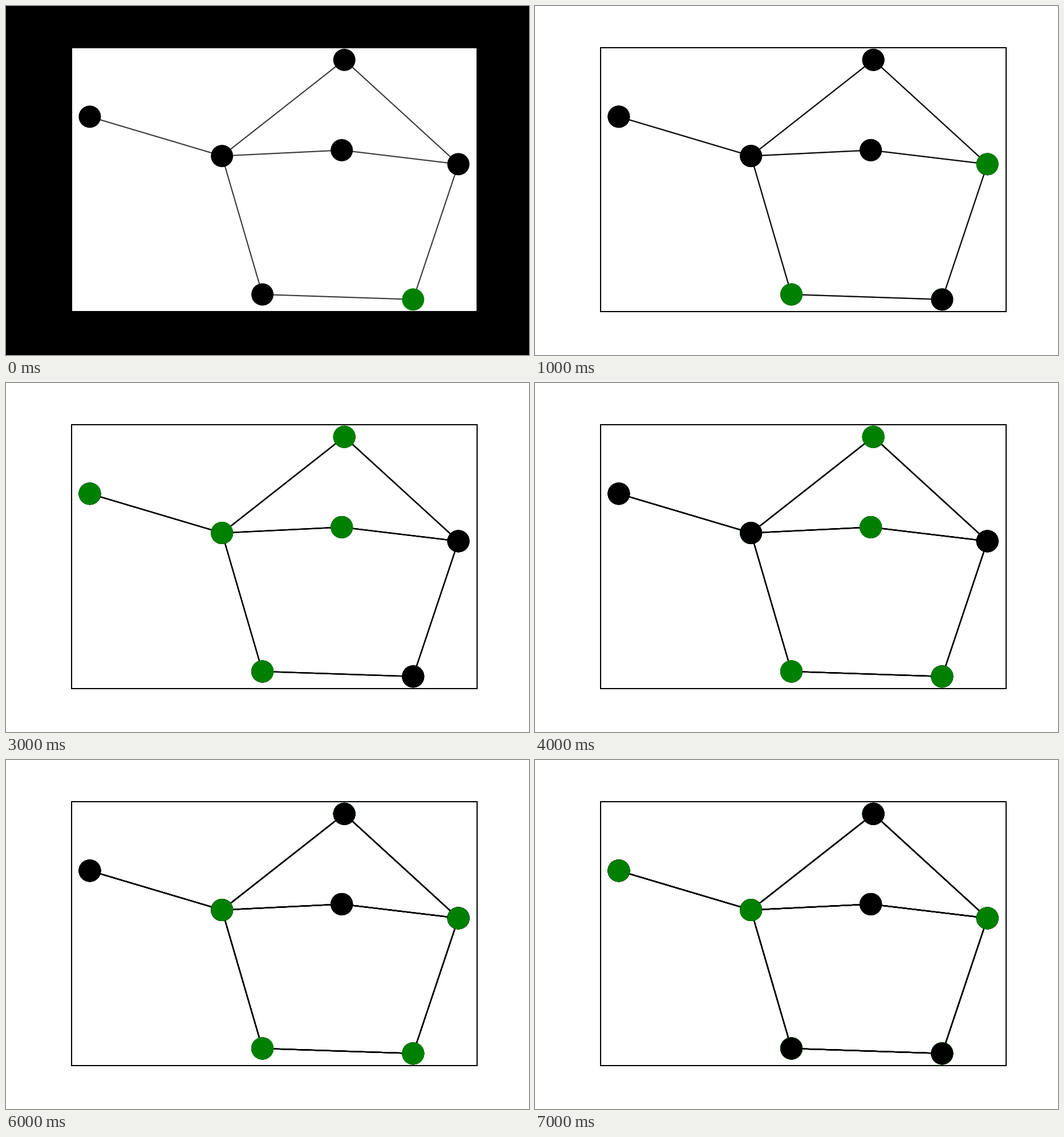
Animation of 917 by 611 pixels, one loop 8000 ms. Source, as a matplotlib script:

```python
import matplotlib.pyplot as plt
from matplotlib.animation import FuncAnimation
from matplotlib.patches import Rectangle

W, H, DPI = 917, 611, 100
PT = 72 / DPI          # points per pixel
STEPS = 8
DIAMETER = 38.9
LINE_WIDTH = 2.12
LINE_ALPHA = 0.77

NODES = {
    "a": (146.9, 193.8),
    "b": (378.7, 262.6),
    "c": (593.2, 94.3),
    "d": (588.7, 252.4),
    "e": (793.2, 276.9),
    "f": (449.6, 505.0),
    "g": (713.8, 513.8),
}
EDGES = ["ab", "bc", "bd", "bf", "ce", "de", "eg", "fg"]


def neighbours(n):
    return [e.replace(n, "") for e in EDGES if n in e]


def step(live):
    """Born with exactly one live neighbour, survive with at most half live."""
    after = set()
    for n in NODES:
        around = neighbours(n)
        count = sum(m in live for m in around)
        if n in live:
            keep = 0 < count <= len(around) / 2
        else:
            keep = count == 1
        if keep:
            after.add(n)
    return after


history = [{"g"}]
while len(history) < STEPS:
    history.append(step(history[-1]))

fig = plt.figure(figsize=((W + 0.01) / DPI, (H + 0.01) / DPI), dpi=DPI,
                 facecolor="white")
ax = fig.add_axes([0, 0, 1, 1])


def box(x0, y0, x1, y1, color):
    ax.add_patch(Rectangle((x0, y0), x1 - x0, y1 - y0, facecolor=color,
                           linewidth=0, antialiased=False, zorder=0))


def draw(k):
    ax.clear()
    ax.set_xlim(0, W)
    ax.set_ylim(H, 0)
    ax.axis("off")
    box(0, 0, W, H, "white" if k else "black")
    box(114, 72, 827, 536, "black")
    box(116, 74, 825, 534, "white")

    # Every step paints over the earlier ones, so the lines darken.
    xs, ys = zip(*NODES.values())
    for live in history[:k + 1]:
        for p, q in EDGES:
            ax.plot(*zip(NODES[p], NODES[q]), color="black",
                    alpha=LINE_ALPHA, lw=LINE_WIDTH * PT, zorder=1)
        colors = ["green" if n in live else "black" for n in NODES]
        ax.scatter(xs, ys, s=(DIAMETER * PT) ** 2, c=colors,
                   linewidths=0, zorder=2)
    return []


anim = FuncAnimation(fig, draw, frames=STEPS, interval=1000,
                     init_func=lambda: draw(0), repeat=True, repeat_delay=0)
plt.show()
```
